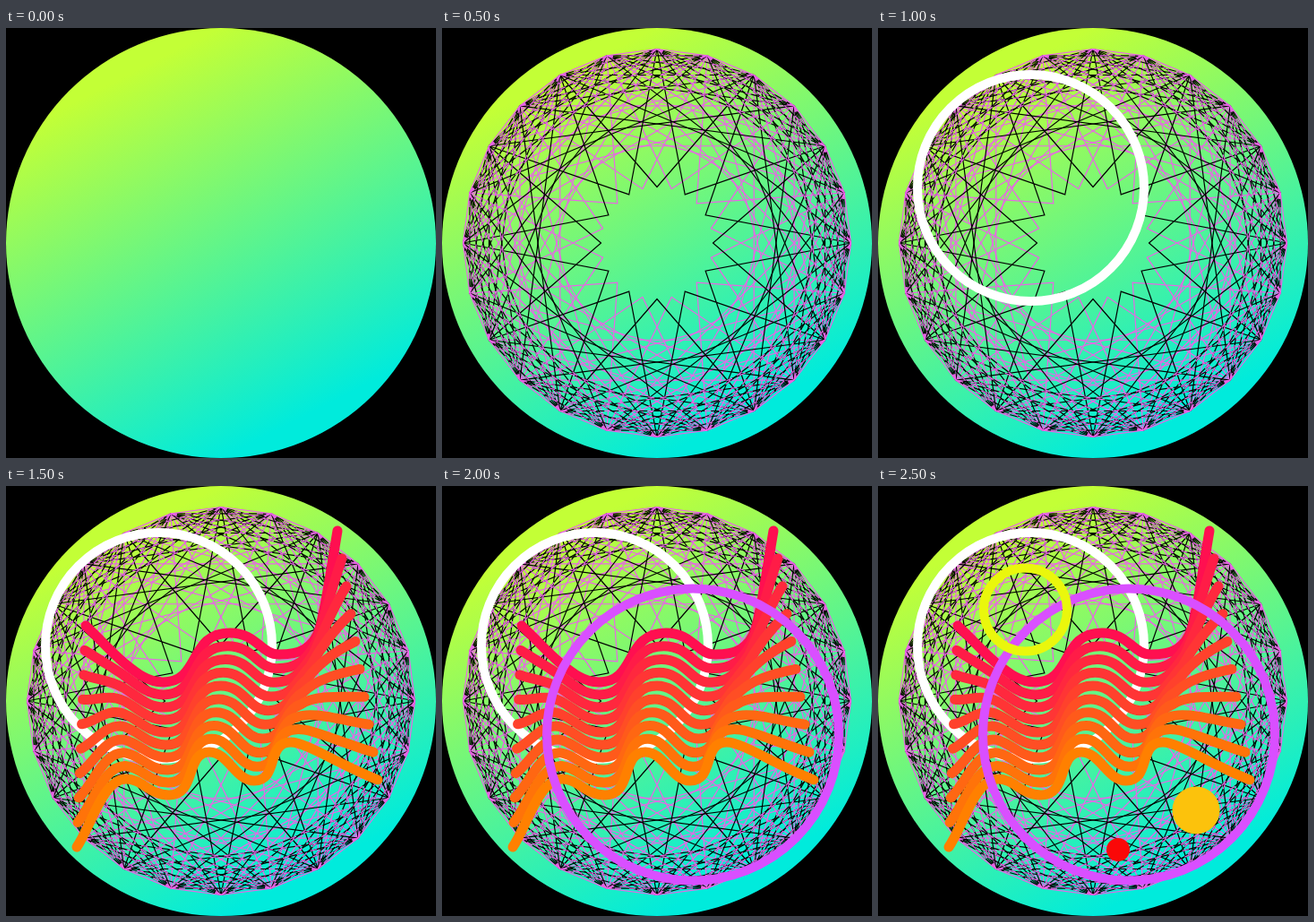
An HTML page with a canvas for the animation above (3 s loop, 480 by 480 pixels).

```html
<!DOCTYPE html>
<html lang="en">
<head>
<meta charset="utf-8">
<title>Layered circles</title>
<style>
  html, body { margin: 0; width: 100%; height: 100%; overflow: hidden; background: #000; }
  canvas { display: block; width: 480px; height: 480px; }
</style>
</head>
<body>
<canvas id="stage" width="480" height="480"></canvas>
<script>
const ctx = document.getElementById('stage').getContext('2d');
const STEP = 500, LOOP = 3000, C = 240, RIM = 216.5, TIP = 62.5, POINTS = 24;
const BLACK = '#000', PINK = '#e965e6';

function circle(x, y, r, color, width) {
  ctx.beginPath();
  ctx.arc(x, y, r, 0, Math.PI * 2);
  if (width) {
    ctx.lineWidth = width;
    ctx.strokeStyle = color;
    ctx.stroke();
  } else {
    ctx.fillStyle = color;
    ctx.fill();
  }
}

function disc() {
  const g = ctx.createLinearGradient(142, 49, 338, 431);
  g.addColorStop(0, '#c3ff36');
  g.addColorStop(1, '#00ebdc');
  circle(C, C, 240, g);
}

const polar = (i, r) => {
  const a = i * Math.PI * 2 / POINTS;
  return [C + r * Math.sin(a), C - r * Math.cos(a)];
};

// All chords that join rim points k steps apart
function chords(k, color, dash = []) {
  ctx.strokeStyle = color;
  ctx.setLineDash(dash);
  for (let i = 0; i < POINTS; i++) {
    ctx.beginPath();
    ctx.moveTo(...polar(i, RIM));
    ctx.lineTo(...polar(i + k, RIM));
    ctx.stroke();
  }
  ctx.setLineDash([]);
}

// Inward spikes, each hung between two rim points
function spikes(first, color) {
  ctx.strokeStyle = color;
  ctx.beginPath();
  for (let i = first; i < POINTS; i += 2) {
    ctx.moveTo(...polar(i - 2, RIM));
    ctx.lineTo(...polar(i, TIP));
    ctx.lineTo(...polar(i + 2, RIM));
  }
  ctx.stroke();
}

function web() {
  ctx.lineWidth = 1.2;
  ctx.lineCap = 'butt';
  chords(8, PINK);
  chords(6, PINK);
  spikes(1, PINK);
  spikes(0, BLACK);
  for (const k of [2, 3, 4, 5, 7]) chords(k, BLACK);
  for (const k of [2, 3, 4, 5]) chords(k, PINK, [7, 9]);
  chords(1, PINK);
}

// Cubic curves: start point, then two controls and an end per segment
const TOP = [89,156, 104,170, 116,184, 130,196, 146,209, 158,219, 175,219,
  218,219, 203,164, 250,164, 280,164, 284,188, 305,188,
  328,188, 342,182, 350,160, 358,130, 364,85, 370,50];
const BOTTOM = [79,403, 95,380, 108,327, 134,327, 152,327, 160,345, 182,345,
  213,345, 200,297, 227,297, 248,297, 256,329, 277,329,
  305,329, 290,286, 318,286, 335,286, 370,310, 415,328];

function waves() {
  ctx.lineWidth = 11;
  ctx.lineCap = 'round';
  for (let n = 0; n < 10; n++) {
    const t = n / 9;
    const p = TOP.map((v, i) => v + (BOTTOM[i] - v) * t);
    ctx.strokeStyle = `rgb(255 ${15 + 113 * t} ${80 - 80 * t})`;
    ctx.beginPath();
    ctx.moveTo(p[0], p[1]);
    for (let i = 2; i < p.length; i += 6) ctx.bezierCurveTo(...p.slice(i, i + 6));
    ctx.stroke();
  }
}

const layers = [
  disc,
  web,
  () => circle(170.5, 178.5, 126.5, '#fff', 10),
  waves,
  () => circle(280, 277.5, 163, '#d94fff', 10),
  () => {
    circle(164.5, 138, 46.5, '#eaf70c', 10);
    circle(355, 362, 26.5, '#fcc20c');
    circle(268, 406, 13, '#fa0808');
  }
];

let shown = -1;
function frame() {
  const step = Math.floor(performance.now() % LOOP / STEP);
  if (step !== shown) {
    shown = step;
    ctx.clearRect(0, 0, 480, 480);
    layers.slice(0, step + 1).forEach(draw => draw());
  }
  requestAnimationFrame(frame);
}
frame();
</script>
</body>
</html>
```
